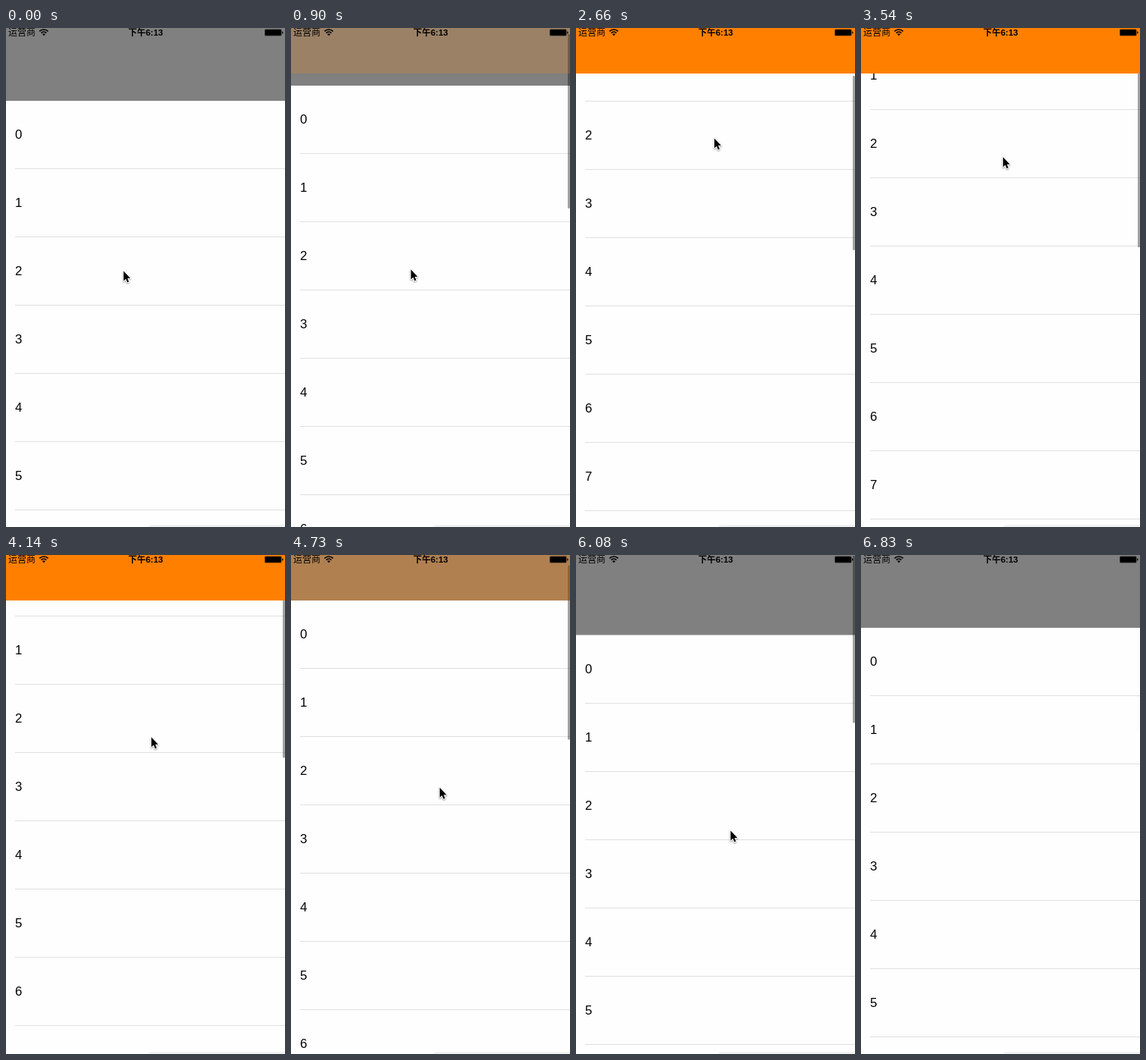
Animation of 369 by 658 pixels, one loop 7730 ms. Source, as an HTML page with a canvas:

```html
<!DOCTYPE html>
<html lang="zh">
<head>
<meta charset="utf-8">
<style>
  html, body { margin: 0; width: 100%; height: 100%; overflow: hidden; background: #fff; }
  canvas { display: block; }
</style>
</head>
<body>
<canvas></canvas>
<script>
const W = 369, H = 658, LOOP = 7730, STEP = 148, LAST = 46;
const REST = 96, ROW = 90, NAV = 60;
const FONT = '"Liberation Sans", Arial, "Noto Sans CJK SC", "Noto Sans CJK", sans-serif';

const canvas = document.querySelector('canvas');
const c = canvas.getContext('2d');
const ratio = window.devicePixelRatio || 1;
canvas.width = W * ratio;
canvas.height = H * ratio;
canvas.style.width = W + 'px';
canvas.style.height = H + 'px';
c.scale(ratio, ratio);

const clamp = v => Math.min(1, Math.max(0, v));

// Progress 0..1 between two steps: accel softens the start, decel the end.
function progress(step, from, to, accel = 1, decel = 1) {
  const u = clamp((step - from) / (to - from));
  return 1 - (1 - u ** accel) ** decel;
}

// The finger drags up, then down past the rest position, and lets go.
function pose(step) {
  const up = progress(step, 5, 21, 1, 1.75);
  const down = progress(step, 21, 39, 1.766, 2.5);
  const bounce = progress(step, 40, 44, 1, 2);
  const top = REST - 189.5 * up + 206.5 * down - 17 * bounce;
  return {
    top: Math.round(top * 2) / 2,
    x: 155 + 29 * up + 20 * progress(step, 21, 39),
    y: 320 + 20 * progress(step, 0, 2) - 206 * up + 229 * progress(step, 21, 39, 1.4, 2),
    bar: step < 6 ? 0 : 1 - .97 * progress(step, 42, LAST),
  };
}

function rect(x, y, w, h, color) {
  c.fillStyle = color;
  c.fillRect(x, y, w, h);
}

function rounded(x, y, w, h, r, color) {
  c.beginPath();
  c.roundRect(x, y, w, h, r);
  c.fillStyle = color;
  c.fill();
}

function text(str, x, y, font, align = 'left') {
  c.font = `${font} ${FONT}`;
  c.textAlign = align;
  c.fillStyle = '#000';
  c.fillText(str, x, y);
}

function drawList(top) {
  rect(0, 0, W, H, '#808080');
  rect(0, top, W, H + ROW, '#fefefe');
  for (let n = 0; n < 10; n++) {
    const y = top + n * ROW;
    text(n, 12, Math.floor(y + 50.5), '16.8px');
    rect(12, Math.floor(y + 89.5), W - 12, 1, '#e0e0e1');
  }
}

function drawScrollBar(top, alpha) {
  const scrolled = REST - top;
  const start = Math.max(0, scrolled * .345) + 1;
  const end = 231 + scrolled * (scrolled > 0 ? .345 : 1);
  rounded(366, start, 3, end - start, 1.2, `rgba(0,0,0,${.36 * alpha})`);
}

function drawStatusBar() {
  text('运营商', 3, 10, '12px');
  text('下午6:13', 184.7, 10, 'bold 11.5px', 'center');

  c.strokeStyle = '#000';
  c.lineWidth = 1.7;
  for (const r of [4.8, 8]) {
    c.beginPath();
    c.arc(50, 10, r, -Math.PI * .75, -Math.PI * .25);
    c.stroke();
  }
  c.beginPath();
  c.moveTo(50, 10.2);
  c.arc(50, 10.2, 2.8, -Math.PI * .75, -Math.PI * .25);
  c.fill();

  rounded(342, 1.5, 22.6, 9, 1.5, 'rgba(0,0,0,.55)');
  rounded(342.8, 2.3, 21, 7.4, 1, '#000');
  rounded(365.2, 4.4, 1.3, 3.2, [0, 1, 1, 0], '#000');
}

function drawCursor(x, y) {
  const arrow = new Path2D('M0 0V13L3 10.3L5 15L7 14.1L5.1 9.5H9Z');
  c.save();
  c.translate(x + .5, y + .5);
  c.shadowColor = 'rgba(0,0,0,.4)';
  c.shadowBlur = 2 * ratio;
  c.shadowOffsetY = ratio;
  c.lineWidth = 2;
  c.lineJoin = 'round';
  c.strokeStyle = '#fff';
  c.stroke(arrow);
  c.shadowColor = 'transparent';
  c.fillStyle = '#000';
  c.fill(arrow);
  c.restore();
}

function draw(step) {
  const { top, x, y, bar } = pose(step);
  drawList(top);
  drawScrollBar(top, bar);
  rect(0, 0, W, NAV, `rgba(255,128,0,${clamp((REST - top) / REST)})`);
  drawStatusBar();
  rounded(187, 655, 200, 12, 10, '#f1f1f1');
  if (step < 44) drawCursor(x, y);
}

const begin = performance.now();
function tick() {
  const time = (performance.now() - begin) % LOOP;
  draw(Math.min(LAST, Math.floor(time / STEP + .1)));
  requestAnimationFrame(tick);
}
tick();
</script>
</body>
</html>
```
